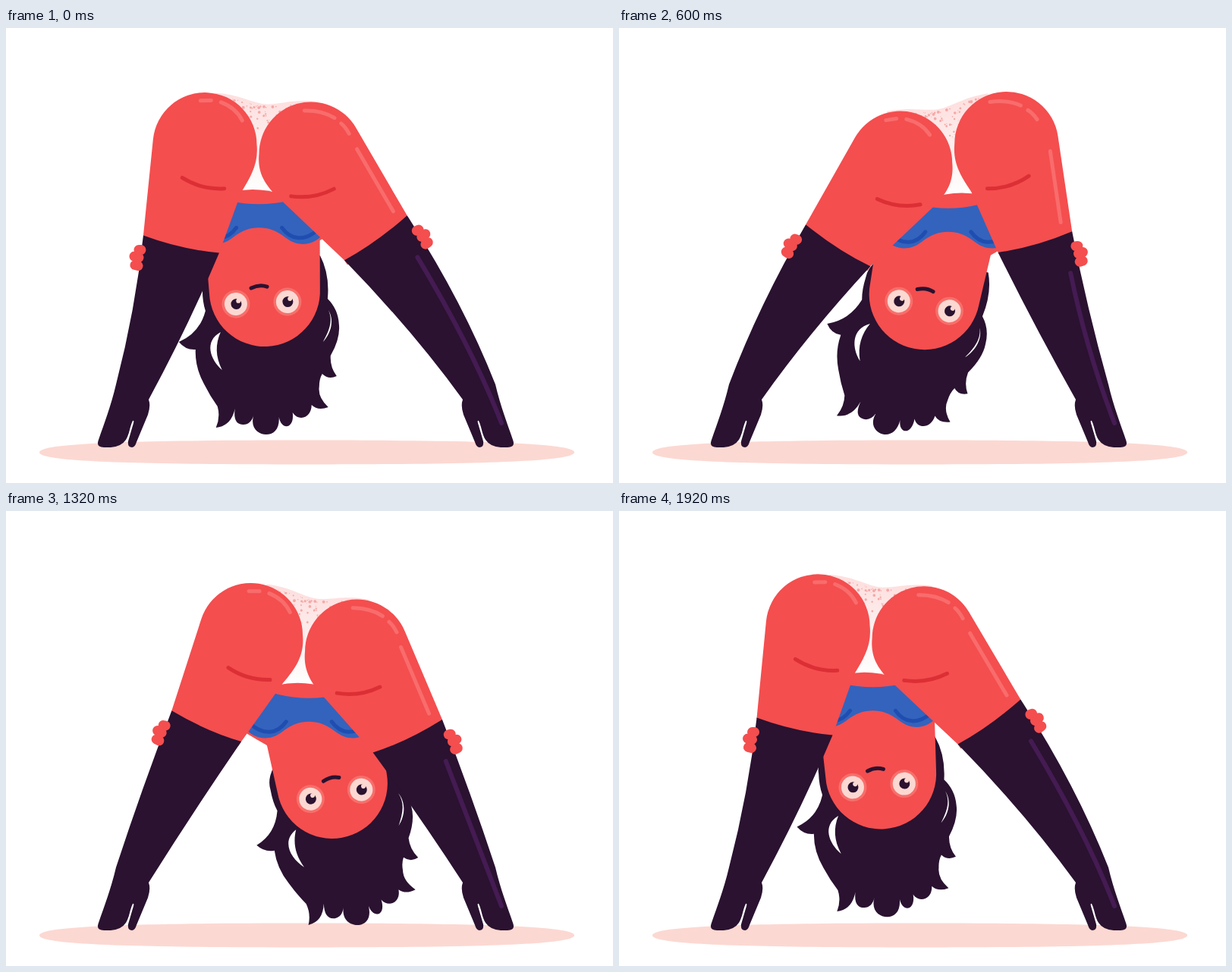
Animation, 800 px wide and 600 px high, one loop 1960 ms. Source, as an HTML page:

```html
<!DOCTYPE html>
<html lang="en">
<head>
<meta charset="utf-8">
<style>
  html, body { margin: 0; width: 100%; height: 100%; overflow: hidden; background: #fff; }
  svg { display: block; width: 100vw; height: 100vh; }
  .skin { fill: #f44e4f; }
  .dark { fill: #2a1230; }
  .line { fill: none; stroke-width: 5; stroke-linecap: round; stroke-linejoin: round; }
  .crease { stroke: #dc2f35; }
  .shine { stroke: #f96c6c; }
  .seam { stroke: #1f4db0; }
  .gloss { stroke: #451b53; stroke-width: 6; }
  .hand { stroke: #f44e4f; stroke-width: 13; }
</style>
</head>
<body>
<svg viewBox="0 0 800 600">
  <defs>
    <linearGradient id="lace" x1="0" y1="0" x2="0" y2="1">
      <stop offset="0" stop-color="#fddfde"/>
      <stop offset=".4" stop-color="#fdecec"/>
      <stop offset="1" stop-color="#fff"/>
    </linearGradient>
    <g id="eye">
      <circle r="18.5" fill="#f76f6b"/>
      <circle r="15" fill="#fcd8d2"/>
      <circle class="dark" cx=".5" r="7"/>
      <circle cx="3.5" cy="-4" r="3" fill="#fcd8d2"/>
    </g>
  </defs>

  <path fill="#fcd8d2" d="M44 559.5C44 548 150 543.5 396 543.5S749 548 749 559.5 642 575.5 396 575.5 44 571 44 559.5"/>

  <g id="panties">
    <path fill="url(#lace)" d="M-68-120C-35-121-18-111 0-111S35-121 68-120L30 8H-30Z"/>
    <g id="dots" fill="#f5a9a8"></g>
  </g>

  <g id="hair">
    <path class="dark" d="M-60-50L-73-31Q-84-16-82-2Q-82 14-78 26Q-86 56-113 67Q-104 78-91 77Q-92 100-80 122
      Q-72 138-62 152Q-58 166-64 180Q-44 178-39 155Q-42 176-28 176Q-18 176-14 163C-20 180-8 189 2 189
      S20 182 19 166C22 184 40 182 37 160C44 172 62 168 62 150Q70 158 84 153Q70 140 72 126Q72 116 76 109
      Q84 117 95 112Q86 100 87 85Q100 62 98 44Q97 24 83 10Q86-22 73-47Z"/>
    <path fill="#fff" d="M-58 54C-80 66-72 90-56 104C-65 86-65 70-58 54M84 25C91 40 84 54 77 67C88 55 92 38 84 25"/>
  </g>

  <path id="torso" class="skin"/>
  <g id="head">
    <path class="skin" d="M-76-75L-73 0A73 73 0 0 0 73 0L76-75Z"/>
    <g id="face">
      <use href="#eye" x="-34"/>
      <use href="#eye" x="34"/>
      <path class="line" stroke="#2a1230" d="M-13-20Q-2-25 8-21"/>
    </g>
  </g>
  <g id="bra">
    <path fill="#3363bd" d="M-80-50Q0-12 80-50L100 0 85 8C72 24 52 26 36 14C22 3 12 0 0 0S-22 3-36 14C-52 26-72 24-85 8L-100 0Z"/>
    <path class="line seam" d="M30 0C42 17 60 18 77 3M-30 0C-42 17-60 18-77 3"/>
  </g>

  <g id="legs"></g>
</svg>
<script>
const LOOP = 1960, HALF = LOOP / 2, AXIS = 394, MIRROR = 790;
const $ = id => document.getElementById(id);
const set = (el, attrs) => { for (const k in attrs) el.setAttribute(k, attrs[k]); };
const make = (parent, tag, attrs) => {
  const el = document.createElementNS('http://www.w3.org/2000/svg', tag);
  set(el, attrs);
  return parent.appendChild(el);
};
const mix = (a, b, k) => a + (b - a) * k;

// Cubic-bezier easing with control points (.33, 0) and (.25, 1).
function ease(x) {
  let lo = 0, hi = 1;
  for (let i = 0; i < 24; i++) {
    const s = (lo + hi) / 2, r = 1 - s;
    if (3 * r * r * s * .33 + 3 * r * s * s * .25 + s ** 3 < x) lo = s; else hi = s;
  }
  return lo * lo * (3 - 2 * lo);
}

// Smooth curve over one swing; the next swing repeats it multiplied by `wrap`.
const KEYS = [0, .1, .347, .449, .673, .775];
function track(values, wrap) {
  const n = KEYS.length;
  const key = i => {
    const turn = Math.floor(i / n), j = i - turn * n;
    return [KEYS[j] + turn, values[j] * (turn % 2 ? wrap : 1)];
  };
  const slope = i => {
    const [a, b, c] = [key(i - 1), key(i), key(i + 1)];
    const h0 = b[0] - a[0], h1 = c[0] - b[0];
    return ((b[1] - a[1]) / h0 * h1 + (c[1] - b[1]) / h1 * h0) / (h0 + h1);
  };
  return u => {
    let i = n - 1;
    while (KEYS[i] > u) i--;
    const [x0, y0] = key(i), [x1, y1] = key(i + 1), h = x1 - x0, s = (u - x0) / h, r = 1 - s;
    return y0 * (1 + 2 * s) * r * r + y1 * s * s * (3 - 2 * s) + h * s * r * (slope(i) * r - slope(i + 1) * s);
  };
}
const headX = track([-53, -62, -36, -16, 16, 27], -1);
const headY = track([347, 349, 359, 354, 350, 346.5], 1);
const headTurn = track([-2.5, 2.5, 10.3, 11.8, 10.2, 8.4], -1);
const faceShift = track([-4.6, -6.8, -2.3, .6, 3.2, 5.2], -1);
const hipTilt = track([6.25, .5, -10.75, -12, -12.75, -12.25], -1);

let seed = 7;
const random = () => (seed = seed * 16807 % 2147483647) / 2147483647;
for (let i = 0; i < 95; i++) {
  const x = (random() - .5) * 110, fall = random() ** 2.2;
  make($('dots'), 'circle', {
    cx: x, cy: -107 - Math.abs(x) * .16 + fall * 42, r: .5 + random() ** 2 * 1.7 * (1 - fall * .6)
  });
}

const FOOT = `C138 500 128 525 122 543Q118 553 129 553H138Q152 552 158 543C163 535 163 526 167 518
  Q169 517 168 521L161 545Q160 553 166 553Q170 553 172 546L187 510Q191 498 188 490`;

function makeLeg(mirrored) {
  const g = make($('legs'), 'g', mirrored ? { transform: `matrix(-1 0 0 1 ${MIRROR} 0)` } : {});
  const leg = {
    mirrored,
    thigh: make(g, 'path', { class: 'skin' }),
    marks: make(g, 'g', {}),
    stocking: make(g, 'path', { class: 'dark' }),
    hand: make(g, 'path', { class: 'line hand', d: 'M-6 19H-3M-12 27.5L-6 29M-11 39L-7 40' })
  };
  make(leg.marks, 'path', { class: 'line crease', d: 'M-28-6Q-2 9 28 6' });
  make(leg.marks, 'path', {
    class: 'line shine',
    d: mirrored ? 'M15-107.5Q-8-109-25-99.5M-34-92.5Q-40-88-45-79.5' : 'M-8-108.5L6-109.5M19-107.5Q39-101 48-84.5'
  });
  if (mirrored) {
    leg.shine = make(g, 'path', { class: 'line shine' });
    leg.gloss = make(g, 'path', { class: 'line gloss' });
  }
  return leg;
}
const leftLeg = makeLeg(false), rightLeg = makeLeg(true);

// (x, y) is the middle of the crease; everything is laid out as a left leg.
function poseLeg(leg, x, y, tilt) {
  const dx = x - 260, dy = y - 204.5, r = 68.5;
  const ox = 181 + .668 * dx - .306 * dy, oy = 273.5 - .267 * dx + .6 * dy;
  const ix = 281 + .53 * dx - .294 * dy, iy = 296.5 + .01 * dx + .68 * dy;
  const cx = x + 2, cy = y - 51;
  const angle = Math.atan2(oy - cy, ox - cx) + Math.acos(r / Math.hypot(ox - cx, oy - cy));
  const tx = cx + r * Math.cos(angle), ty = cy + r * Math.sin(angle);
  const px = x + 46.5 + .17 * (ix - x), py = y + 12;
  const hem = `Q${(ox + ix) / 2} ${(oy + iy) / 2 + 7}`;

  set(leg.thigh, { d: `M${ox} ${oy}L${tx} ${ty}A${r} ${r} 0 0 1 ${cx + r} ${cy}
    C${x + 73} ${y - 25} ${x + 62} ${y - 8} ${px} ${py}L${ix} ${iy}L${ix - 4} ${iy + 6}L${ox} ${oy + 2}Z` });
  set(leg.marks, { transform: `translate(${x} ${y}) rotate(${tilt})` });

  const midOut = (oy + 470) / 2, midIn = (iy + 490) / 2;
  const outX = mix((ox + 145) / 2, 145 + .31 * (470 - midOut), .6);
  const inX = mix((ix + 188) / 2, 188 + .6 * (490 - midIn), .5);
  set(leg.stocking, { d: `M${ox} ${oy}Q${outX} ${midOut} 145 470${FOOT}Q${inX} ${midIn} ${ix} ${iy}${hem} ${ox} ${oy}` });

  const lean = Math.atan2(ox - 145, 470 - oy) * 180 / Math.PI - 10.4;
  set(leg.hand, { transform: `translate(${ox - .15 * lean} ${oy + .2 * lean}) rotate(${1.3 * lean})` });

  if (leg.mirrored) {
    const len = Math.hypot(ox - tx, oy - ty), ux = (ox - tx) / len, uy = (oy - ty) / len;
    const ex = ox - 14 * ux + 13 * uy, ey = oy - 14 * uy - 13 * ux;
    set(leg.shine, { d: `M${ex - 95 * ux} ${ey - 95 * uy}L${ex} ${ey}` });
    const gx = ox - (ox - 145) / (470 - oy) * 55 + 15;
    set(leg.gloss, { d: `M${gx} ${oy + 55}Q174 425 137 521` });
  }
}

function draw(time) {
  const t = time % LOOP, side = t < HALF ? 1 : -1, u = t % HALF / HALF, p = ease(u);
  const x = AXIS + side * (124 * p - 62), y = 210.8 + 14.5 * Math.sin(Math.PI * p);
  const d = side * hipTilt(u), turn = side * headTurn(u);
  const hx = AXIS + side * headX(u), hy = headY(u);
  const chestX = x + .18 * (hx - x), chest = `translate(${chestX} ${y + 52.5})`;

  set($('panties'), { transform: `translate(${x} ${y}) rotate(${Math.atan2(d, 72) * 180 / Math.PI})` });
  const swing = turn + 2.5;
  set($('hair'), { transform: `translate(${hx} ${hy}) skewX(${-.3 * swing}) rotate(${swing})` });
  set($('torso'), {
    transform: chest,
    d: `M-70 ${-30 - d * .8}Q0-70 70 ${-30 + d * .8}L105 2L68 24L40 40H-40L-68 24L-105 2Z`
  });
  set($('head'), { transform: `translate(${hx} ${hy}) rotate(${turn})` });
  set($('face'), { transform: `translate(${side * faceShift(u)} 15.3)` });
  set($('bra'), { transform: chest });
  poseLeg(leftLeg, x - 72, y - d, .37 * d);
  poseLeg(rightLeg, MIRROR - x - 72, y + d, -.37 * d);
}

const start = performance.now();
function tick() {
  draw(performance.now() - start);
  requestAnimationFrame(tick);
}
tick();
</script>
</body>
</html>
```
